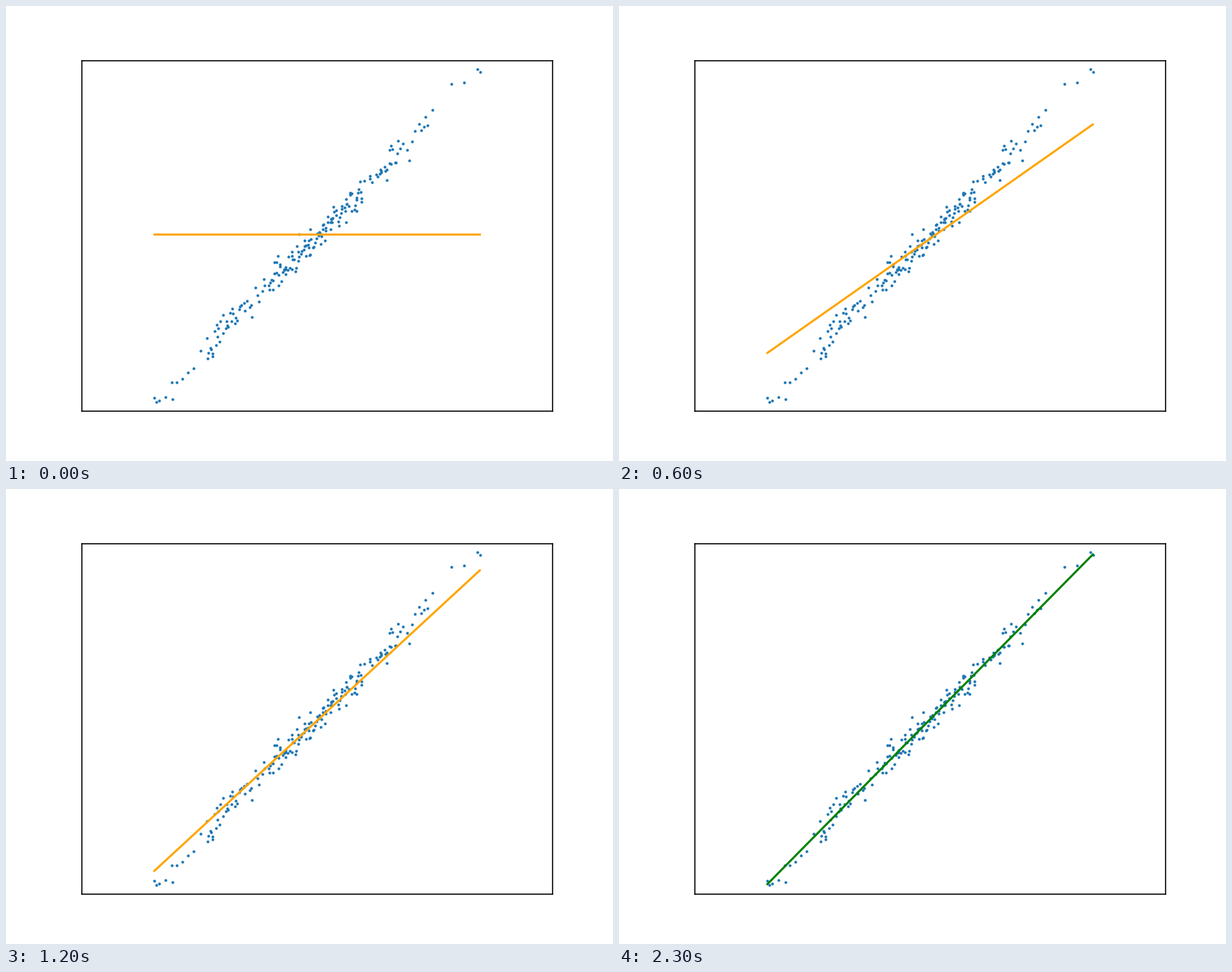
Recreate the animation shown at these times as a matplotlib script. Size 864 by 648 pixels, loop 2.5 s.

```python
import numpy as np
import matplotlib.pyplot as plt
from matplotlib.animation import FuncAnimation

W, H, DPI = 864, 648, 144
FRAMES, STEP_MS = 25, 100
LAST = 23                      # the fit has converged here
X0, X1 = 211.2, 674.4          # ends of the fitted line
XC = (X0 + X1) / 2

# Isolated dots at both tips of the cloud
TIPS = [(671, 90), (675, 94), (652, 109), (634, 111),
        (211, 558), (214, 564), (218, 562), (237, 560)]


def make_dots(n=192):
    """Bell-shaped spread along x, normal noise around the final line."""
    rng = np.random.default_rng(7)
    count = [0, 7, 36, 50, 156, 162, 179, n]
    edge = [227, 285, 335, 375, 508, 530, 558, 610]
    x = np.interp(np.arange(n), count, edge) + rng.normal(0, 1.5, n)
    noise = np.clip(rng.normal(0, 11, n), -28, 28)
    y = 327.5 - 1.013 * (x - XC) + noise
    return np.vstack([TIPS, np.column_stack([x, y])])


def line_ends(step):
    """Gradient descent in closed form: the slope decays towards its limit."""
    done = 1 - 0.825 ** step
    rise = 237.6 * done
    mid = 324.6 + 3 * done + 2.9 * step * 0.805 ** step
    return [mid + rise, mid - rise]


fig = plt.figure(figsize=(W / DPI, H / DPI), dpi=DPI, facecolor="white")
ax = fig.add_axes([0.125, 0.11, 0.775, 0.77])
ax.set_xlim(0.125 * W, 0.9 * W)
ax.set_ylim(0.89 * H, 0.12 * H)
ax.set_xticks([])
ax.set_yticks([])

ax.plot(*make_dots().T, "o", ms=2, mew=0, color="tab:blue", zorder=1)
fit, = ax.plot([X0, X1], line_ends(0), color="orange", lw=1.5)


def update(i):
    step = min(i, LAST)
    fit.set_ydata(line_ends(step))
    fit.set_color("green" if step == LAST else "orange")
    return fit,


anim = FuncAnimation(fig, update, frames=FRAMES, interval=STEP_MS,
                     repeat=True, repeat_delay=0)
plt.show()
```
